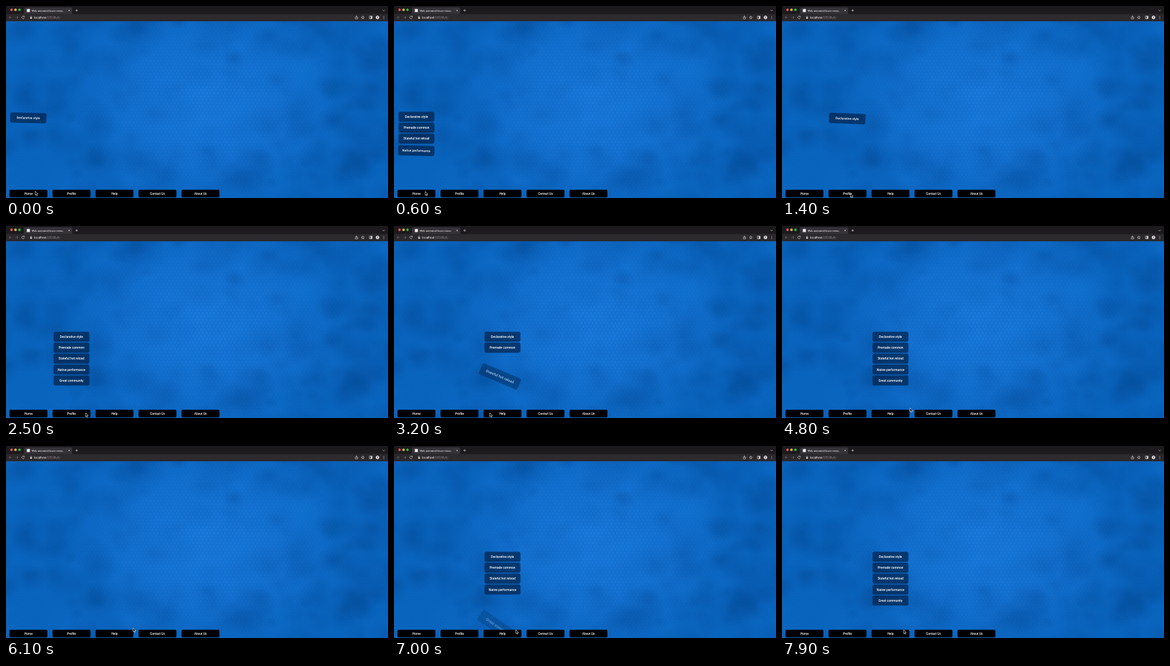
Recreate the animation shown at these times as an HTML page with a canvas. Size 600x302 px, loop 8000 ms.

```html
<!DOCTYPE html>
<html lang="en">
<head>
<meta charset="utf-8">
<title>Web animated hover menu</title>
<style>
  html, body { margin: 0; width: 100%; height: 100%; overflow: hidden; background: #0862b8; }
  canvas, svg { position: absolute; left: 0; top: 0; width: 100%; height: 100%; display: block; }
  text { font-family: Roboto, "Open Sans", sans-serif; fill: #fff; }
  .label { font-size: 4.75px; font-weight: 500; text-anchor: middle; }
  .item .label { font-size: 4.9px; }
  .item rect { fill: #021e40; fill-opacity: .66; stroke: #003a7c; stroke-opacity: .5; stroke-width: .6; }
  .address { font-family: Inter, sans-serif; font-size: 4.55px; }
  .icon { fill: none; stroke: #d5d3d6; stroke-width: .65; }
</style>
</head>
<body>
<canvas width="600" height="302"></canvas>
<svg viewBox="0 0 600 302" preserveAspectRatio="none">
  <g id="items"></g>
  <g id="buttons"></g>

  <rect width="600" height="13" fill="#1c1a1d"/>
  <path d="M26 13Q28 13 28 11V4.500Q28 2 30.500 2H101.500Q104 2 104 4.500V11Q104 13 106 13Z" fill="#353237"/>
  <rect y="12.500" width="600" height="11.500" fill="#2b282c"/>
  <circle cx="8.700" cy="6" r="1.900" fill="#fe5f57"/>
  <circle cx="15" cy="6" r="1.900" fill="#febc2e"/>
  <circle cx="21.200" cy="6" r="1.900" fill="#28c840"/>
  <rect x="32.700" y="4.700" width="4.800" height="4.800" fill="#eee"/>
  <text x="40.500" y="8.600" font-size="4.150">Web animated hover menu</text>
  <g class="icon">
    <path d="M97.800 5.800l2.600 2.600m0-2.600l-2.600 2.600M109 7h4m-2-2v4M591.500 6.200l1.700 1.700 1.700-1.700"/>
    <path d="M9 18H4.800m2-2l-2 2 2 2M14.800 18H19m-2-2l2 2-2 2" stroke="#77747a"/>
    <path d="M28.600 16.700A2.100 2.100 0 1 0 28.900 18.600M28.900 15.500v1.700h-1.700"/>
    <rect x="38" y="17.700" width="2.800" height="2.300" fill="#d5d3d6" stroke="none"/>
    <path d="M38.600 17.700v-.8a.8.800 0 0 1 1.600 0v.8"/>
    <path d="M549.400 17.300h-.7v3h3.600v-3h-.7M550.500 19v-3.300m-1.100 1l1.100-1 1.100 1"/>
    <path d="M560.500 15.600l.7 1.600 1.700.2-1.300 1.100.4 1.700-1.500-.9-1.500.9.400-1.700-1.300-1.100 1.700-.2z"/>
    <rect x="571" y="16" width="4" height="4" stroke="#fff"/>
    <path d="M574 16v4" stroke="#fff" stroke-width="1.500"/>
  </g>
  <rect x="34" y="14.600" width="526" height="7" rx="3.500" fill="#fff" opacity=".015"/>
  <circle cx="583.500" cy="18" r="2.700" fill="#e8e6e9"/>
  <circle cx="583.500" cy="17.300" r=".9" fill="#39363a"/>
  <path d="M582 19.500q1.500-1.500 3 0z" fill="#39363a"/>
  <g fill="#d5d3d6">
    <circle cx="593.300" cy="16.200" r=".5"/><circle cx="593.300" cy="18" r=".5"/><circle cx="593.300" cy="19.800" r=".5"/>
  </g>
  <text x="44" y="19.700" class="address">localhost<tspan fill="#8e8b91">:50598/#/</tspan></text>

  <path id="cursor" d="M0 0V5.900L1.400 4.700 2.300 6.800 3.300 6.400 2.400 4.300H4.200Z" fill="#000" stroke="#fff" stroke-width=".6"/>
</svg>
<script>
const LOOP = 8000, TICK = 100, ITEM_TIME = 200;
const PITCH = 67.55, FIRST_X = 35.3;
const buttonNames = ["Home", "Profile", "Help", "Contact Us", "About Us"];
const itemNames = ["Declarative style", "Premade common", "Stateful hot reload",
                   "Native performance", "Great community"];

const visits = [
  { column: 0, from: -194, to: 1100 },
  { column: 1, from: 1210, to: 2620 },
  { column: 2, from: 2700, to: 5900 },
  { column: 2, from: 6150, to: LOOP }
];

// time, x, y
const cursorPath = [
  [0, 46, 291.5], [800, 50, 292], [1100, 66, 293], [1400, 107.5, 295],
  [1900, 112, 295], [2500, 125, 294], [2700, 141, 294], [3200, 150.5, 294],
  [3600, 158, 293], [4400, 201.2, 286.3], [5800, 201.2, 286.3], [5900, 202, 285.5],
  [6100, 199.7, 286.3], [6700, 192, 289], [7200, 191, 289.3], [LOOP, 191, 289.3]
];

function make(parent, tag, attrs, text = "") {
  const node = document.createElementNS("http://www.w3.org/2000/svg", tag);
  for (const key in attrs) node.setAttribute(key, attrs[key]);
  node.textContent = text;
  return parent.appendChild(node);
}

function box(parent, name, width, height, radius, attrs = {}) {
  const g = make(parent, "g", attrs);
  make(g, "rect", { x: -width / 2, y: -height / 2, width, height, rx: radius });
  make(g, "text", { class: "label", y: 1.7 }, name);
  return g;
}

const byId = id => document.getElementById(id);
const columnX = i => FIRST_X + i * PITCH;
buttonNames.forEach((name, i) =>
  box(byId("buttons"), name, 59.5, 12, 2, { transform: `translate(${columnX(i)} 295)` }));
const items = itemNames.map(name => box(byId("items"), name, 56, 15.6, 2.4, { class: "item" }));

function paintBackdrop() {
  const ctx = document.querySelector("canvas").getContext("2d");
  let seed = 71;
  const random = () => (seed = seed * 16807 % 2147483647) / 2147483647;

  const glow = (x, y, rx, ry, stops) => {
    ctx.save();
    ctx.translate(x, y);
    ctx.scale(1, ry / rx);
    const fill = ctx.createRadialGradient(0, 0, 0, 0, 0, rx);
    stops.forEach((color, i) => fill.addColorStop(i / (stops.length - 1), color));
    ctx.fillStyle = fill;
    ctx.fillRect(-rx, -rx, 2 * rx, 2 * rx);
    ctx.restore();
  };

  ctx.fillStyle = "#0964bd";
  ctx.fillRect(0, 0, 600, 302);
  glow(315, 155, 270, 210, ["rgba(28,126,226,.9)", "rgba(24,118,216,.6)", "rgba(9,100,189,0)"]);

  // cloudy patches, darker away from the middle
  for (let i = 0; i < 420; i++) {
    const x = random() * 640 - 20, y = random() * 310 + 10;
    const far = Math.min(1, Math.hypot((x - 315) / 290, (y - 155) / 190));
    const r = 10 + random() * 22;
    const dark = random() < .25 + .4 * far;
    const rgb = dark ? "0,66,138" : "22,120,218";
    const alpha = dark ? .05 + .17 * far : .1;
    glow(x, y, r * 1.2, r, [`rgba(${rgb},${alpha})`, `rgba(${rgb},${alpha / 2})`, `rgba(${rgb},0)`]);
  }

  // honeycomb, strongest near the middle
  const side = 3.4, stepX = side * Math.sqrt(3), stepY = side * 1.5;
  ctx.lineWidth = .6;
  for (let row = 0; row < 62; row++) {
    for (let col = 0; col < 104; col++) {
      const x = (col + row % 2 / 2) * stepX, y = 20 + row * stepY;
      const far = Math.hypot((x - 315) / 250, (y - 155) / 190);
      const alpha = Math.max(.025, .2 * (1 - far));
      ctx.strokeStyle = `rgba(0,62,140,${alpha})`;
      ctx.beginPath();
      for (let k = 0; k < 4; k++) {
        const a = Math.PI * (k / 3 - .5);
        ctx.lineTo(x + side * Math.cos(a), y + side * Math.sin(a));
      }
      ctx.stroke();
    }
  }
}

function cursorAt(time) {
  const next = Math.max(1, cursorPath.findIndex(p => p[0] >= time));
  const [t0, x0, y0] = cursorPath[next - 1], [t1, x1, y1] = cursorPath[next];
  const k = (time - t0) / (t1 - t0);
  return [x0 + (x1 - x0) * k, y0 + (y1 - y0) * k];
}

function draw(time) {
  const visit = visits.find(v => time >= v.from && time < v.to);
  items.forEach((item, i) => {
    const progress = visit ? (time - visit.from) / ITEM_TIME - i : 0;
    const left = 1 - Math.max(0, Math.min(1, progress));
    item.setAttribute("opacity", 1 - left ** 1.4);
    if (left === 1) return;
    const x = columnX(visit.column) - 8 * left;
    const y = 174.2 + 17.2 * i + 56 * left;
    item.setAttribute("transform",
      `translate(${x} ${y}) rotate(${46 * left}) scale(${1 + .34 * left})`);
  });
  byId("cursor").setAttribute("transform", `translate(${cursorAt(time)})`);
}

function frame() {
  draw(Math.floor(performance.now() % LOOP / TICK) * TICK);
  requestAnimationFrame(frame);
}

paintBackdrop();
frame();
</script>
</body>
</html>
```
